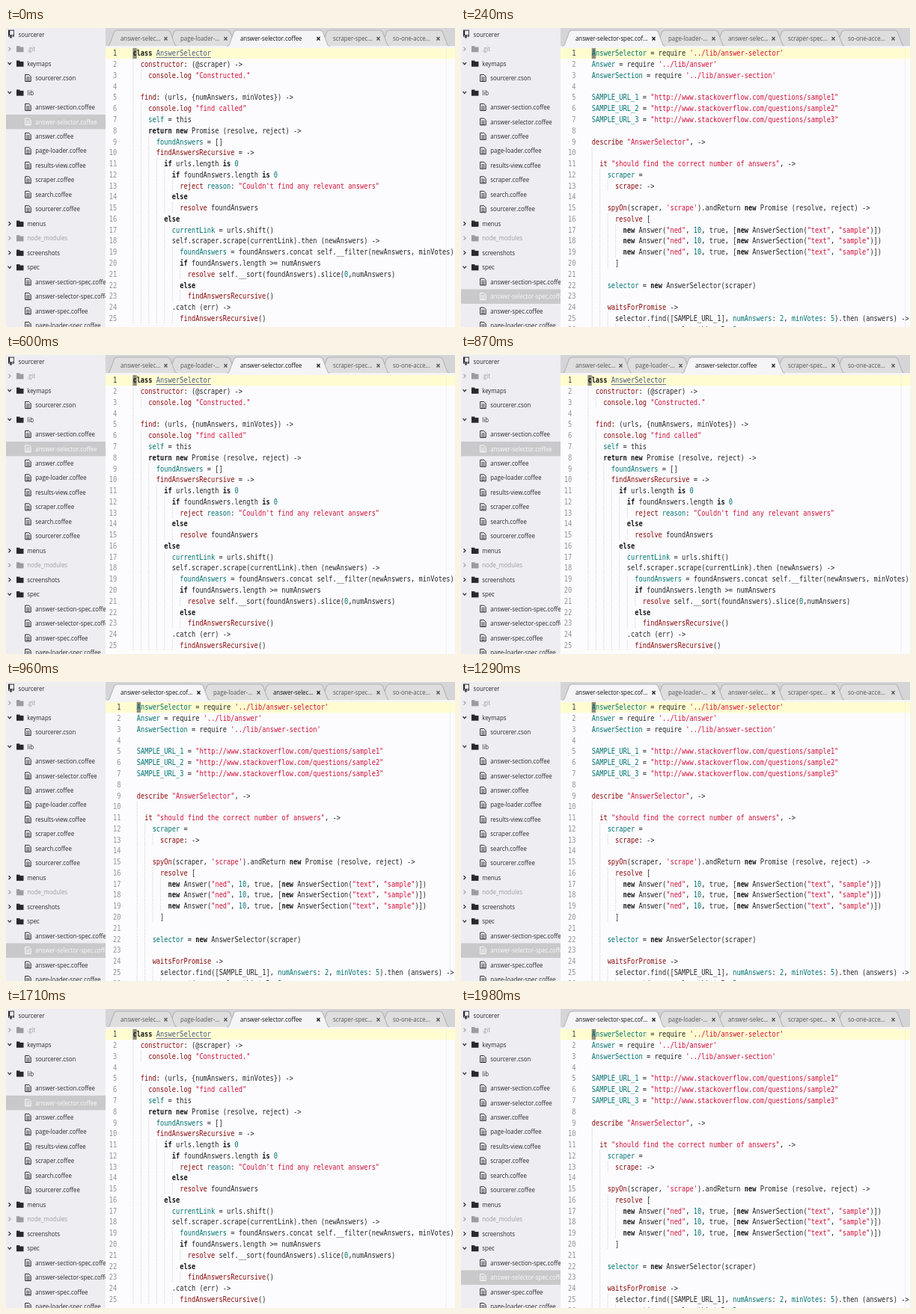
Animation, 600 px wide and 400 px high, one loop 2010 ms. Source, as an HTML page with a canvas:

```html
<!DOCTYPE html>
<html lang="en">
<head>
<meta charset="utf-8">
<title>Switching between code and spec</title>
<style>
html, body { margin: 0; width: 100%; height: 100%; overflow: hidden; background: #fcfcfe; }
canvas { display: block; width: 600px; height: 400px; }
</style>
</head>
<body>
<canvas id="stage" width="600" height="400"></canvas>
<script>
const g = document.getElementById('stage').getContext('2d');
const UI = '8.9px "Open Sans", "Noto Sans", sans-serif';
const MONO = '9.88px "DejaVu Sans Mono", "Liberation Mono", monospace';
const SQUASH = 0.88; // the whole screen is narrowed by this factor
const LOOP = 2010, FIRST = 190, HOLD = 385, FADE = 25;
const SIDE = 133, ROW = 19.47, LINE = 14.77, CHAR = 5.235;
const PANEL = '#eeeef2', BAR = '#d5d5d8', TAB = '#dededf', ACTIVE = '#f5f5f8', PAPER = '#fcfcfe';
const INK = '#262626', MAROON = '#8c0a0a', TEAL = '#007272', CLASS = '#445588';

const codeText = `class AnswerSelector
  constructor: (@scraper) ->
    console.log "Constructed."

  find: (urls, {numAnswers, minVotes}) ->
    console.log "find called"
    self = this
    return new Promise (resolve, reject) ->
      foundAnswers = []
      findAnswersRecursive = ->
        if urls.length is 0
          if foundAnswers.length is 0
            reject reason: "Couldn't find any relevant answers"
          else
            resolve foundAnswers
        else
          currentLink = urls.shift()
          self.scraper.scrape(currentLink).then (newAnswers) ->
            foundAnswers = foundAnswers.concat self.__filter(newAnswers, minVotes)
            if foundAnswers.length >= numAnswers
              resolve self.__sort(foundAnswers).slice(0,numAnswers)
            else
              findAnswersRecursive()
          .catch (err) ->
            findAnswersRecursive()`;

const answer = '        new Answer("ned", 10, true, [new AnswerSection("text", "sample")])\n';
const specText = `AnswerSelector = require '../lib/answer-selector'
Answer = require '../lib/answer'
AnswerSection = require '../lib/answer-section'

SAMPLE_URL_1 = "http://www.stackoverflow.com/questions/sample1"
SAMPLE_URL_2 = "http://www.stackoverflow.com/questions/sample2"
SAMPLE_URL_3 = "http://www.stackoverflow.com/questions/sample3"

describe "AnswerSelector", ->

  it "should find the correct number of answers", ->
    scraper =
      scrape: ->

    spyOn(scraper, 'scrape').andReturn new Promise (resolve, reject) ->
      resolve [
${answer.repeat(3)}      ]

    selector = new AnswerSelector(scraper)

    waitsForPromise ->
      selector.find([SAMPLE_URL_1], numAnswers: 2, minVotes: 5).then (answers) ->
        expect(answers.length).toBe 2`;

// First match wins: pattern, colour, weight
const rules = [
  [/^("[^"]*"|'[^']*')/, '#d01038'],
  [/^(class|if|else|is|return|new)\b/, '#181818', 'bold '],
  [/^\w+(?= = ->|: \(|: ->)/, MAROON],
  [/^\w+(?= =(?!=)|:)/, TEAL],
  [/^(console\.log|findAnswersRecursive|describe|it|spyOn|waitsForPromise|expect)\b/, MAROON],
  [/^(resolve|reject)(?= )/, MAROON],
  [/^\d+\b/, TEAL],
  [/^(\w+|\s+|.)/, INK]
];

function tokens(line) {
  const out = [];
  for (let col = 0; col < line.length;) {
    const rest = line.slice(col);
    const [pattern, color, weight = ''] = rules.find(r => r[0].test(rest));
    const text = rest.match(pattern)[0];
    const named = line.slice(0, col) === 'class ';
    out.push({ text, col, weight, color: named ? CLASS : color });
    col += text.length;
  }
  return out;
}

function parse(source) {
  const lines = source.split('\n');
  const depth = i => lines[i] ? lines[i].search(/\S/) / 2 : i + 1 < lines.length ? depth(i + 1) : 0;
  return lines.map((line, i) => ({ tokens: tokens(line), depth: depth(i) }));
}

const views = [
  { lines: parse(codeText), left: 169.4, selected: 6, active: 2, starts: [153, 233, 313, 437, 517],
    titles: ['answer-selec...', 'page-loader-...', 'answer-selector.coffee', 'scraper-spec...', 'so-one-acce...'] },
  { lines: parse(specText), left: 174.7, selected: 18, active: 0, starts: [153, 277, 357, 437, 517],
    titles: ['answer-selector-spec.cof...', 'page-loader-...', 'answer-selec...', 'scraper-spec...', 'so-one-acce...'] }
];

// '>' closed folder, 'v' open folder, '~' dimmed, otherwise a file
const tree = `sourcerer
>~.git
vkeymaps
 sourcerer.cson
vlib
 answer-section.coffee
 answer-selector.coffee
 answer.coffee
 page-loader.coffee
 results-view.coffee
 scraper.coffee
 search.coffee
 sourcerer.coffee
>menus
>~node_modules
>screenshots
vspec
 answer-section-spec.coffee
 answer-selector-spec.coffee
 answer-spec.coffee
 page-loader-spec.coffee`.split('\n');

function box(x, y, w, h, color) {
  g.fillStyle = color;
  g.fillRect(x, y, w, h);
}

function path(points, color, fill, width = 1) {
  g.beginPath();
  for (let i = 0; i < points.length; i += 2) g.lineTo(points[i], points[i + 1]);
  if (fill) { g.fillStyle = fill; g.fill(); }
  if (color) { g.strokeStyle = color; g.lineWidth = width; g.stroke(); }
}

function write(text, x, y, font, color, align = 'left') {
  g.save();
  g.translate(x, y);
  g.scale(SQUASH, 1);
  g.font = font;
  g.fillStyle = color;
  g.textAlign = align;
  g.fillText(text, 0, 0);
  g.restore();
}

function fileIcon(x, y, color) {
  path([x, y - 4.5, x + 5, y - 4.5, x + 7.5, y - 2, x + 7.5, y + 4.5, x, y + 4.5, x, y - 4.5], color);
  for (const dy of [-1.5, 0.5, 2.5]) box(x + 1.5, y + dy, 4.5, 0.9, color);
}

function folderIcon(x, y, color) {
  box(x, y - 4, 4.5, 2, color);
  box(x, y - 2.6, 9.5, 6.8, color);
}

function repoIcon(x, y, color) {
  box(x, y - 5, 8, 9, color);
  box(x + 2.2, y - 4, 5, 5.5, PANEL);
  box(x + 1, y + 2.3, 6, 0.9, PANEL);
  box(x + 2.5, y + 2.5, 2, 3.5, color);
}

function drawTree(selected) {
  g.save();
  g.beginPath();
  g.rect(0, 0, SIDE, 400);
  g.clip();
  box(0, 0, SIDE, 400, PANEL);
  tree.forEach((row, i) => {
    const y = 8.6 + i * ROW, kind = row[0];
    const dim = row[1] === '~', name = row.replace(/^[>v ]~?/, '');
    let color = dim ? '#9c9ca0' : '#29292b', x = 39.3;
    if (i === selected) {
      box(0, y - 9.6, SIDE, ROW, '#c9c9cb');
      color = '#fafafa';
    }
    if (!i) {
      x = 16.5;
      repoIcon(3, y - 1, color);
    } else if (kind === ' ') {
      fileIcon(25.7, y, color);
    } else {
      x = 28.2;
      folderIcon(14, y, color);
      path(kind === 'v' ? [2.5, y - 1.5, 4.8, y + 1.2, 7, y - 1.5]
                        : [3.5, y - 2.5, 6, y, 3.5, y + 2.5], color, null, 1.2);
    }
    write(name, x, y + 3.1, UI, color);
  });
  g.restore();
}

function drawTab(view, i, color) {
  const left = view.starts[i] - 12, right = (view.starts[i + 1] || 597) - 12;
  const on = i === view.active, cross = right - 7.5;
  path([left - 6, 24.5, left - 3, 23, left + 4, 4.5, left + 7, 3, right - 5, 3, right - 2, 4.5, right + 5, 23, right + 8, 24.5],
       '#a4a4a8', on ? ACTIVE : TAB, 0.8);
  write(view.titles[i], view.starts[i], 16.8, UI, color);
  path([cross - 2, 12, cross + 2, 16.5], color, null, 1.2);
  path([cross + 2, 12, cross - 2, 16.5], color, null, 1.2);
}

function drawTabs(view, fading) {
  box(SIDE, 0, 467, 25, BAR);
  const other = 2 - view.active;
  for (let i = 4; i >= 0; i--)
    if (i !== view.active) drawTab(view, i, fading && i === other ? '#111' : '#555558');
  box(SIDE, 24, 467, 2.5, ACTIVE);
  drawTab(view, view.active, '#111');
}

function drawEditor(view) {
  box(SIDE, 0, 467, 400, PAPER);
  box(SIDE, 26.5, 467, LINE, '#fffdd0');
  const guide = x => path([x, 26.5, x, 400], '#ebebee', null, 0.8);
  guide(view.left + 80 * CHAR);
  box(view.left, 26.7, 5.3, 14.3, '#8c8c7c');
  view.lines.forEach((line, i) => {
    const y = 34 + i * LINE, base = y + 3.4;
    write(i + 1, view.left - 21.2, base, MONO, i ? '#929296' : '#3c3c3c', 'right');
    g.setLineDash([1.5, 1.5]);
    for (let d = 0; d < line.depth; d++) {
      const x = view.left + d * 2 * CHAR + 0.5;
      path([x, y - LINE / 2, x, y + LINE / 2], '#c8c8ce', null, 0.8);
    }
    g.setLineDash([]);
    for (const t of line.tokens) {
      const x = view.left + t.col * CHAR;
      write(t.text, x, base, t.weight + MONO, t.color);
      if (t.color === CLASS) box(x, base + 1.6, t.text.length * CHAR, 0.8, CLASS);
    }
  });
}

const start = performance.now();

function draw() {
  const t = Math.floor((performance.now() - start) % LOOP / 30) * 30;
  const since = t - FIRST;
  const view = views[(Math.floor(since / HOLD) + 1) % 2];
  const fading = since >= 0 && since % HOLD < FADE;
  drawEditor(view);
  drawTabs(view, fading);
  drawTree(view.selected);
  requestAnimationFrame(draw);
}
draw();
</script>
</body>
</html>
```
